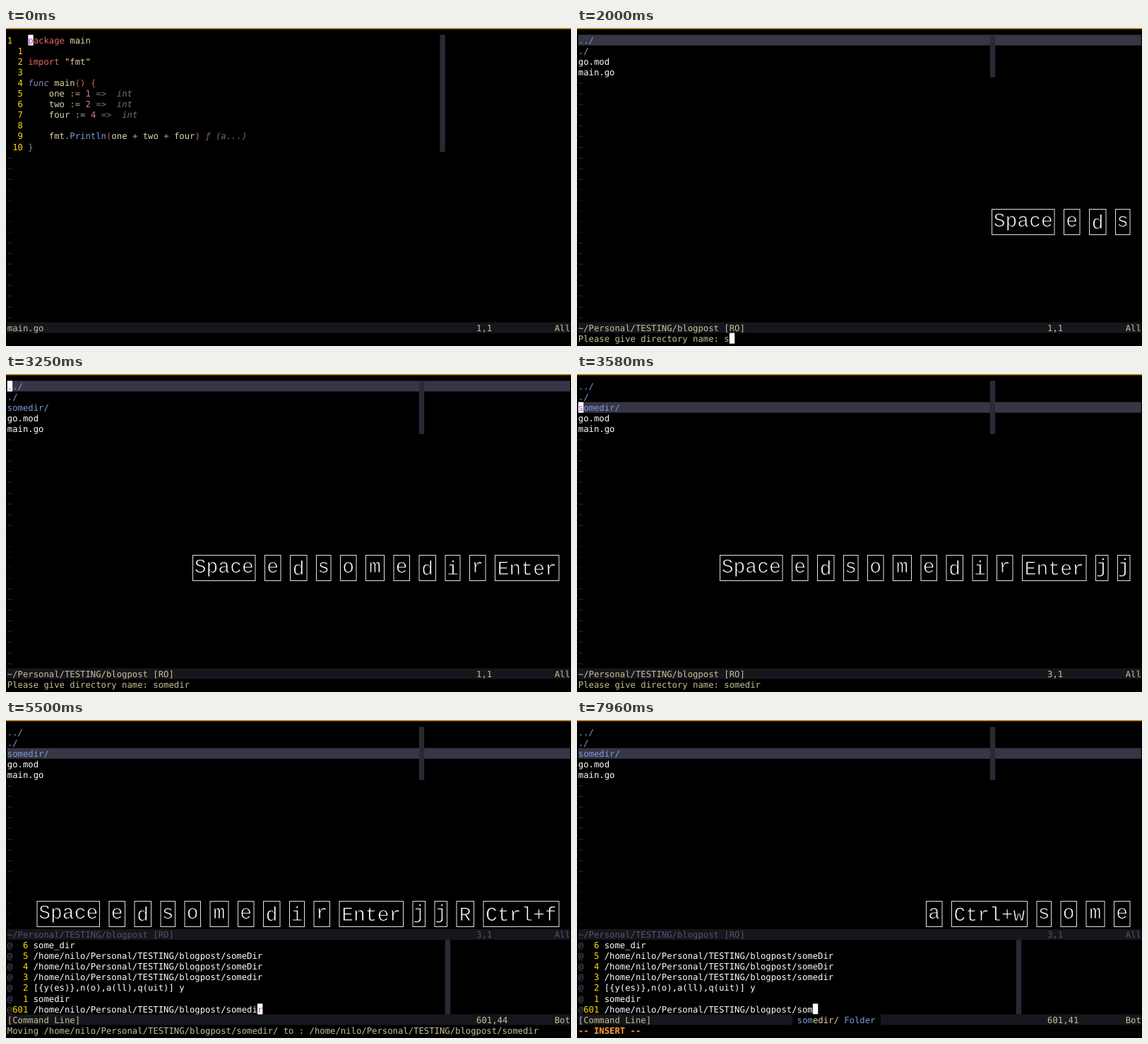
An HTML page that plays this animation: 800x450 px, repeating every 8000 ms.

```html
<!DOCTYPE html>
<html lang="en">
<head>
<meta charset="utf-8">
<title>Renaming a directory in the editor</title>
<style>
html, body { margin: 0; width: 100%; height: 100%; overflow: hidden; background: #000; }
svg { display: block; width: 800px; height: 450px; }
text { white-space: pre; text-rendering: geometricPrecision; font: 12.26px "DejaVu Sans Mono", monospace; }
.i { font-style: italic; }
.b { font-weight: bold; }
/* the black outline thins the strokes of the letters */
.key { font: 28px "Liberation Mono", monospace; text-anchor: middle; fill: #fff; stroke: #000; stroke-width: .8px; }
</style>
</head>
<body>
<svg id="stage" viewBox="0 0 800 450"></svg>
<script>
const LOOP = 8000, CW = 7.38, RH = 15.07, LEFT = 1.8, TOP = 9.6, BASE = 12.2;
const C = {
  fg: '#dcd7ba', white: '#fff', dir: '#7e9cd8', num: '#ffd70a', dim: '#727169',
  tan: '#c8c093', gold: '#c0a36e', red: '#df6a62', violet: '#957fb8', pink: '#d27e99',
  bracket: '#c46a50', str: '#e6d3a0', grey: '#54546d', bar: '#16161d',
  line: '#363646', column: '#2a2a37', insert: '#ff9e3b', under: '#c23fd0'
};
const HOME = '/home/nilo/Personal/TESTING/blogpost/';
const FOLDER = '~/Personal/TESTING/blogpost [RO]';

const KEYS = [
  [500, 'Space'], [620, 'e'], [1250, 'd'],
  [1830, 's'], [2040, 'o'], [2130, 'm'], [2250, 'e'], [2380, 'd'], [2460, 'i'], [2580, 'r'],
  [2670, 'Enter'], [3290, 'j'], [3460, 'j'], [3830, 'R'], [4710, 'Ctrl+f'],
  [6500, 'a'], [7000, 'Ctrl+w'], [7670, 's'], [7790, 'o'], [7880, 'm'], [7960, 'e']
];
const KEYS_RESET = 6500, GAP = 13.5;
const KEY_W = {
  Space: 88.5, Enter: 90.5, 'Ctrl+f': 107, 'Ctrl+w': 107, e: 22.5, d: 23.5, s: 20.5,
  o: 22.5, m: 26, i: 21, r: 22.5, j: 17.5, R: 24.5, a: 22.5
};

const NAME_AT = [1880, 2080, 2170, 2290, 2420, 2500, 2630];
const EDIT_AT = [7710, 7830, 7920];
const AT = {
  list: 670, ask: 1300, made: 2750, down1: 3330, down2: 3500, move: 3920,
  hide: 4630, cmdwin: 4790, show: 5460, insert: 6540, cut: 7040, menu: 7170
};
const STOPS = [0, ...KEYS.map(k => k[0]), ...NAME_AT, ...EDIT_AT, ...Object.values(AT)].sort((a, b) => a - b);

const CODE = [
  [[0, 'package', C.red], [8, 'main', C.str]],
  [],
  [[0, 'import', C.red], [7, '"fmt"', C.str]],
  [],
  [[0, 'func', C.violet, 'i'], [5, 'main', C.str], [9, '()', C.bracket], [12, '{', C.bracket]],
  assign('one', 1), assign('two', 2), assign('four', 4),
  [],
  [[4, 'fmt', C.str], [7, '.', C.gold], [8, 'Println', C.dir], [15, '(', C.bracket], [16, 'one', C.fg],
   [20, '+', C.gold], [22, 'two', C.fg], [26, '+', C.gold], [28, 'four', C.fg], [32, ')', C.bracket],
   [34, 'ƒ (a...)', C.dim, 'i']],
  [[0, '}', C.violet]]
];

function assign(name, value) {
  const c = 5 + name.length;
  return [[4, name, C.fg], [c, ':=', C.gold], [c + 3, value, C.pink],
          [c + 5, '=>', C.dim, 'i'], [c + 9, 'int', C.dim, 'i']];
}

const svg = document.getElementById('stage');
let out = '';

const colX = c => LEFT + c * CW;
const rowY = r => TOP + r * RH;
const typed = (word, times, t) => word.slice(0, times.filter(x => x <= t).length);

function put(row, col, str, fill, cls = '') {
  out += `<text x="${colX(col)}" y="${rowY(row) + BASE}" fill="${fill}" class="${cls}">${str}</text>`;
}
function box(row, col, cols, rows, fill) {
  out += `<rect x="${colX(col)}" y="${rowY(row)}" width="${cols * CW}" height="${rows * RH}" fill="${fill}"/>`;
}
function cursor(row, col, ch = '') {
  box(row, col, 1, 1, '#fff');
  put(row, col, ch, C.under);
}
function status(row, name, pos, where, color = C.tan) {
  box(row, 0, 108, 1, C.bar);
  put(row, 0, name, color);
  put(row, 90, pos, color);
  put(row, 105, where, color);
}
function tildes(from, to) {
  for (let r = from; r <= to; r++) put(r, 0, '~', r > 13 && r < 19 ? '#15151b' : '#2a2a37');
}

function editor() {
  box(0, 83, 1, 11, C.column);
  CODE.forEach((line, r) => {
    put(r, r ? 3 - String(r).length : 0, r || 1, C.num);
    line.forEach(([col, str, fill, cls]) => put(r, col + 4, str, fill, cls));
  });
  tildes(11, 26);
  cursor(0, 4, 'p');
  status(27, 'main.go', '1,1', 'All');
}

function listing(t) {
  const files = ['../', './', 'go.mod', 'main.go'];
  if (t >= AT.made) files.splice(2, 0, 'somedir/');
  const sel = t >= AT.down2 ? 2 : t >= AT.down1 ? 1 : 0;
  const win = t >= AT.cmdwin;
  box(sel, 0, 108, 1, C.line);
  box(0, 79, 1, files.length, C.column);
  files.forEach((f, r) => put(r, 0, f, f.endsWith('/') ? C.dir : C.white));
  tildes(files.length, win ? 18 : 26);
  status(win ? 19 : 27, FOLDER, `${sel + 1},1`, 'All', win ? C.grey : C.tan);
  const asking = t >= AT.ask && t < AT.made || t >= AT.move;
  if (!asking) cursor(sel, 0, files[sel][0]);
}

function prompt(t) {
  if (t >= AT.move) {
    const msg = `Moving ${HOME}somedir/ to : ${HOME}somedir`;
    put(28, 0, msg, C.tan);
    if (t < AT.hide) cursor(28, msg.length);
  } else if (t >= AT.ask) {
    const msg = 'Please give directory name: ' + typed('somedir', NAME_AT, t);
    put(28, 0, msg, C.tan);
    if (t < AT.made) cursor(28, msg.length);
  }
}

function menuRow(row, name, kind, hit = 0) {
  box(row, 41, 17, 1, '#000');
  put(row, 42, name.slice(0, hit), C.dir);
  put(row, 42 + hit, name.slice(hit), C.str);
  put(row, 51, kind, C.dir);
}

function commandWindow(t) {
  const part = typed('som', EDIT_AT, t);
  const last = HOME + (t >= AT.cut ? part : 'somedir');
  const lines = ['some_dir', HOME + 'someDir', HOME + 'someDir', HOME + 'somedir',
                 '[{y(es)},n(o),a(ll),q(uit)] y', 'somedir', last];
  box(20, 84, 1, 7, C.column);
  lines.forEach((line, i) => {
    const n = String(6 - i || 601);
    put(20 + i, 0, '@', C.grey);
    put(20 + i, 4 - n.length, n, C.num);
    put(20 + i, 5, line, C.white);
  });
  const inserting = t >= AT.insert;
  const pos = last.length + (inserting ? 1 : 0);
  status(27, '[Command Line]', '601,' + pos, 'Bot');
  if (inserting) {
    put(28, 0, '-- INSERT --', C.insert, 'b');
    cursor(26, 4 + pos);
  } else {
    prompt(t);
    if (t >= AT.show) cursor(26, 4 + pos, 'r');
  }
  if (part) {
    menuRow(27, 'somedir/', 'Folder', part.length);
  } else if (t >= AT.menu) {
    menuRow(23, 'somedir/', 'Folder');
    menuRow(24, 'go.mod', 'File');
    menuRow(25, 'main.go', 'File');
  }
}

function keys(t) {
  const since = t >= KEYS_RESET ? KEYS_RESET : 0;
  const shown = KEYS.filter(([at]) => at <= t && at >= since);
  let right = 783;
  for (const [, k] of shown.reverse()) {
    const w = KEY_W[k], x = right - w;
    const base = /[pj]/.test(k) || /^[esomra]$/.test(k) ? 281 : 284;
    out += `<rect x="${x}" y="256.5" width="${w}" height="36" fill="#000" stroke="#e4e4e4"/>` +
           `<text class="key" x="${x + w / 2}" y="${base}">${k}</text>`;
    right = x - GAP;
  }
}

function draw(t) {
  out = '<rect width="800" height="450"/><rect width="800" height="1.5" fill="#dc9a1c"/>';
  if (t < AT.list) editor();
  else listing(t);
  if (t >= AT.cmdwin) commandWindow(t);
  else prompt(t);
  keys(t);
  svg.innerHTML = out;
}

let shownStop = -1;
function tick() {
  const t = performance.now() % LOOP;
  const stop = STOPS.filter(s => s <= t).pop();
  if (stop !== shownStop) draw(shownStop = stop);
  requestAnimationFrame(tick);
}
tick();
</script>
</body>
</html>
```
